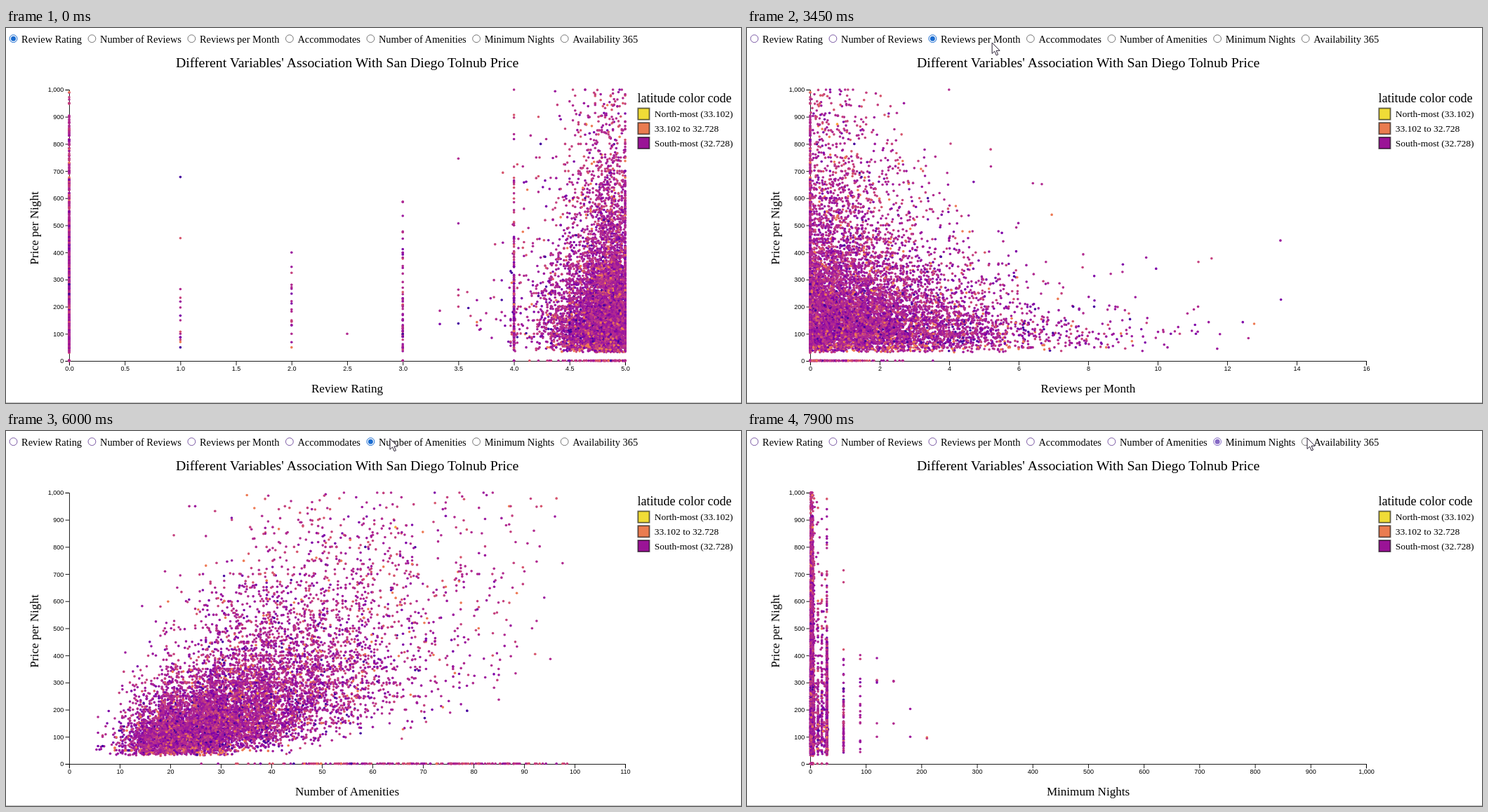
Recreate the animation shown at these times as an HTML page with a canvas. Size 1047 by 535 pixels, loop 8000 ms.

```html
<!DOCTYPE html>
<html lang="en">
<head>
<meta charset="utf-8">
<title>Price scatter plot</title>
<style>
  html, body { margin: 0; width: 100%; height: 100%; overflow: hidden; background: #fff; }
  svg, canvas { position: absolute; left: 0; top: 0; }
  text { font-family: "Liberation Serif", "Times New Roman", Times, serif; }
  .tick { font: 9px "Liberation Sans", Arial, sans-serif; }
  .option { font-size: 14.4px; }
  .label { font-size: 17.1px; text-anchor: middle; }
  .line { fill: none; stroke: #000; stroke-width: .9; }
</style>
</head>
<body>
<svg id="chart" width="1047" height="535">
  <g id="fixed"></g>
  <g id="options"></g>
  <g id="axis"></g>
</svg>
<canvas id="dots" width="1047" height="535"></canvas>
<svg width="1047" height="535">
  <path id="pointer" d="M0 0V15.5L3.6 12.2 6.1 18 8.5 17 6 11.3H11Z" fill="#fff" stroke="#2a2035"/>
</svg>
<script>
const LOOP = 8000, MOVE = 500;
const X0 = 90, Y0 = 475, WIDTH = 792, HEIGHT = 387;

const views = [
  { key: 'rating', name: 'Review Rating', max: 5, step: .5, start: 0 },
  { key: 'reviews', name: 'Number of Reviews', max: 1000, step: 100, start: 1430 },
  { key: 'monthly', name: 'Reviews per Month', max: 16, step: 2, start: 2930 },
  { key: 'sleeps', name: 'Accommodates', max: 16, step: 2, start: 4370 },
  { key: 'amenities', name: 'Number of Amenities', max: 110, step: 10, start: 5850 },
  { key: 'nights', name: 'Minimum Nights', max: 1000, step: 100, start: 7380 },
  { name: 'Availability 365', start: Infinity }
];

const $ = id => document.getElementById(id);
const lerp = (a, b, k) => a + (b - a) * k;
const clamp = (v, low, high) => Math.max(low, Math.min(high, v));
const text = (x, y, s, attrs = '') => `<text x="${x}" y="${y}" ${attrs}>${s}</text>`;

// ---- seeded listings ----
let seed = 20773;
function rand() {
  seed = seed + 0x6D2B79F5 | 0;
  let t = Math.imul(seed ^ seed >>> 15, 1 | seed);
  t = t + Math.imul(t ^ t >>> 7, 61 | t) ^ t;
  return ((t ^ t >>> 14) >>> 0) / 4294967296;
}
const expo = () => -Math.log(1 - rand());
const gauss = () => Math.sqrt(2 * expo()) * Math.cos(2 * Math.PI * rand());

// Even group sizes are more common; the largest homes share the cap
function pickSleeps() {
  let n;
  do n = 1 + Math.floor(20 * rand());
  while (rand() > n * Math.exp(-n / 2.2) * (n % 2 ? .25 : 1) / .82);
  return Math.min(16, n);
}

// One to three votes give whole stars and fractions, many votes a smooth spread
function pickRating() {
  if (rand() < .14) {
    const votes = 1 + Math.floor(3 * rand() ** 2);
    return Math.max(1, 5 - Math.floor(.95 * expo()) / votes);
  }
  return Math.max(1, Math.round(500 - 11 * (expo() + expo()) ** 1.1) / 100);
}

function pickAmenities() {
  let n;
  do n = Math.round(rand() < .15 ? 33 + 3 * gauss() : 41 + 17 * gauss());
  while (n < 1 || n > 72 && rand() < .6);
  return n;
}

// Monthly lets have a long tail, the rest are days or whole weeks
function pickNights(price) {
  if (rand() < (price < 450 ? .16 : .03)) return Math.min(998, 30 * Math.floor(rand() ** -.28));
  const kind = rand();
  if (kind < .03) return 7 * Math.ceil(3 * rand());
  if (kind < .05) return Math.ceil(32 * rand());
  return 1 + Math.floor(5 * rand() ** 1.5);
}

const colors = ['#46039f', '#7e03a8', '#9c179e', '#b12a90', '#c5407e', '#d6556d', '#ed7953', '#fba238'];
function pickColor(price) {
  const shade = rand() < (price < 62 ? .2 : .035) ? 6 : Math.round(2.4 + 1.1 * gauss() + price / 1200);
  return colors[clamp(shade, 0, 7)];
}

function makeHome() {
  const sleeps = pickSleeps(), reviewed = rand() > .15;
  let price = (50 + 28 * sleeps + 1.2 * sleeps ** 2) * Math.exp(.53 * gauss()) * (reviewed ? 1 : 1.35);
  if (price < 32) price = 30 + 35 * rand();
  if (rand() < .12) price = Math.max(50, Math.round(price / 50) * 50);
  price = Math.round(price);
  const damp = 1 / (1 + price / 500);
  return {
    sleeps,
    // prices above the scale collapse to their thousands digit
    price: price > 1000 ? Math.floor(price / 1000) : price,
    rating: reviewed && pickRating(),
    reviews: reviewed && Math.min(965, Math.ceil(63 * damp * expo() ** 1.35)),
    monthly: reviewed && 2.8 * damp * expo() ** .87,
    amenities: pickAmenities(),
    nights: pickNights(price),
    color: pickColor(price)
  };
}
const homes = Array.from({ length: 10800 }, makeHome);

// ---- page furniture ----
function drawFixed() {
  let s = text(242, 56, "Different Variables' Association With San Diego Tolnub Price", 'font-size="19.8"');
  s += text(0, 0, 'Price per Night', 'class="label" transform="translate(45.5 285.5) rotate(-90)"');
  s += text(899.5, 105.5, 'latitude color code', 'font-size="18"');
  [['#f0dc37', 'North-most (33.102)'], ['#ea7c50', '33.102 to 32.728'], ['#9a1396', 'South-most (32.728)']]
    .forEach(([fill, name], i) => {
      const y = 114.5 + 20.7 * i;
      s += `<rect x="900.3" y="${y}" width="16.2" height="16.2" fill="${fill}" stroke="#000" stroke-opacity=".6" stroke-width="1.8"/>`;
      s += text(923.7, y + 12.8, name, 'font-size="13.5"');
    });
  let d = 'M84.6 88.45H90.45V475.45H84.6';
  for (let p = 0; p <= 1000; p += 100) {
    const y = Y0 - HEIGHT * p / 1000;
    d += `M84.6 ${y + .45}H90`;
    s += text(82.3, y + 3.4, p.toLocaleString('en-US'), 'class="tick" text-anchor="end"');
  }
  s += `<path class="line" d="${d}"/><path d="M0 534.5H1047" stroke="#bdbdbd"/>`;
  $('fixed').innerHTML = s;
}

// Each radio follows the measured caption before it
function layOutOptions() {
  $('options').innerHTML = views.map(v => text(0, 0, v.name, 'class="option"')).join('');
  let x = 10.5;
  [...$('options').children].forEach((caption, i) => {
    views[i].radio = x;
    x += caption.getComputedTextLength() + 26;
  });
}

function drawView(current) {
  $('options').innerHTML = views.map(({ radio, name }, i) => {
    const on = i === current;
    const edge = on ? (i % 2 ? '#8468c4' : '#1a6cd0') : i < current ? '#7a58a4' : '#767676';
    return `<circle cx="${radio}" cy="15.2" r="5.4" fill="#fff" stroke="${edge}"/>` +
      (on ? `<circle cx="${radio}" cy="15.2" r="3.5" fill="${edge}"/>` : '') +
      text(radio + 11.6, 21, name, 'class="option"');
  }).join('');

  const { name, max, step } = views[current];
  let d = 'M90.45 481.3V475.45H882.45V481.3', s = text(486, 519.6, name, 'class="label"');
  for (let v = 0; v <= max; v += step) {
    const x = X0 + WIDTH * v / max + .45;
    d += `M${x} 475V481.3`;
    s += text(x, 489.2, step < 1 ? v.toFixed(1) : v.toLocaleString('en-US'), 'class="tick" text-anchor="middle"');
  }
  $('axis').innerHTML = `<path class="line" d="${d}"/>` + s;
}

const ctx = $('dots').getContext('2d');
function drawDots(current, k) {
  const to = views[current], from = views[Math.max(0, current - 1)];
  ctx.clearRect(0, 0, 1047, 535);
  for (const h of homes) {
    const x = X0 + WIDTH * lerp(h[from.key] / from.max, h[to.key] / to.max, k);
    ctx.fillStyle = h.color;
    ctx.beginPath();
    ctx.arc(x, Y0 - HEIGHT * h.price / 1000, 1.8, 0, 7);
    ctx.fill();
  }
}

// ---- pointer: time, x, y ----
const path = [
  [140, 722, 424], [900, 124, 12], [1360, 169, 19], [1940, 256, 20], [2440, 263, 11], [2810, 263, 11],
  [3450, 349, 21], [3900, 398, 12], [4370, 404, 8], [4870, 532, 18], [4970, 522, 17], [5500, 522, 17],
  [5630, 516, 11], [5850, 516, 11], [6660, 682, 10], [7380, 674, 6], [7900, 798, 10], [LOOP, 798, 10]
];
function drawPointer(t) {
  const i = path.findIndex(p => p[0] > t);
  $('pointer').style.display = i > 0 ? '' : 'none';
  if (i < 1) return;
  const [a, b] = [path[i - 1], path[i]], k = (t - a[0]) / (b[0] - a[0]);
  $('pointer').setAttribute('transform', `translate(${lerp(a[1], b[1], k)} ${lerp(a[2], b[2], k)})`);
}

let shownView = -1, shownK = -1;
function frame() {
  const t = performance.now() % LOOP;
  const current = views.filter(v => v.start <= t).length - 1;
  const k = Math.min(1, (t - views[current].start) / MOVE);
  if (current !== shownView) drawView(current);
  if (current !== shownView || k !== shownK) drawDots(current, k);
  [shownView, shownK] = [current, k];
  drawPointer(t);
  requestAnimationFrame(frame);
}
drawFixed();
layOutOptions();
frame();
</script>
</body>
</html>
```
